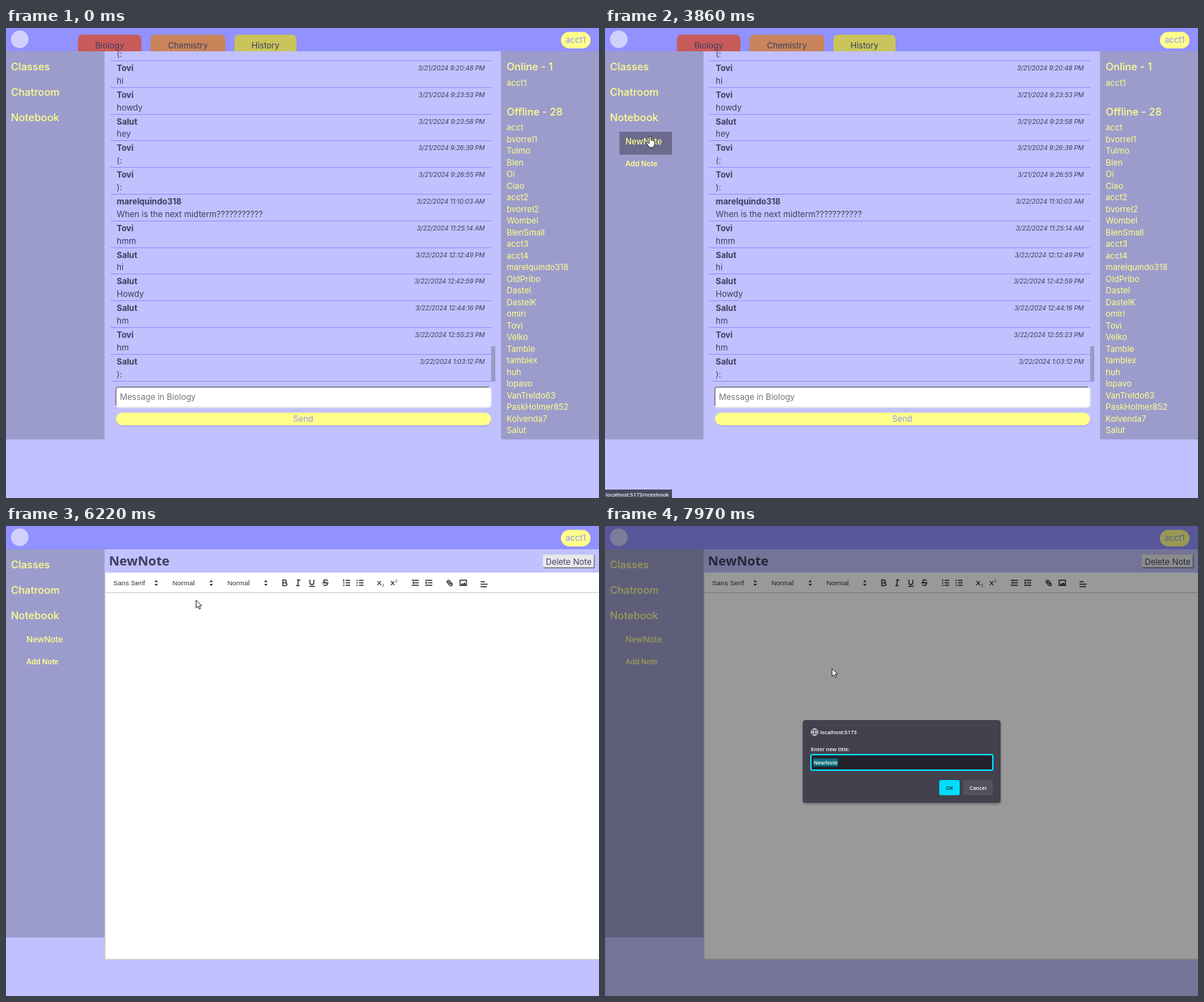
Animation of 841x666 px, one loop 8000 ms. Source, as an HTML page:

```html
<!DOCTYPE html>
<html lang="en">
<head>
<meta charset="utf-8">
<title>Class chat and notebook</title>
<style>
  html, body { margin: 0; width: 100%; height: 100%; overflow: hidden; background: #c1c1ff; }
  svg { display: block; width: 841px; height: 666px; }
  text { font: 11.7px Inter, sans-serif; fill: #3f3e5e; white-space: pre; }
  .yellow { fill: #ffff8a; }
  .head { font-size: 14.7px; font-weight: 500; }
  .item { font-weight: 500; }
  .add { font-size: 10.1px; font-weight: 600; }
  .bold { font-weight: 700; }
  .date { font-size: 9.2px; font-style: italic; letter-spacing: -.15px; text-anchor: end; }
  .mid { text-anchor: middle; }
  .lilac { fill: #9191ff; }
  .hint { fill: #75757f; }
  .title { font: 700 18.3px "Noto Sans", sans-serif; }
  .tool { font: 9.8px "Liberation Sans", sans-serif; fill: #333; }
  .tool.bold { font-weight: 700; }
  .tool.small { font-size: 6px; }
  .ui { font: 600 7.5px "Open Sans", sans-serif; fill: #fff; }
  .dark { fill: #23222b; }
  .icon { fill: none; stroke: #333; stroke-width: 1.4; }
</style>
</head>
<body>
<svg id="stage" viewBox="0 0 841 666"></svg>
<script>
const LOOP = 8000;
const YELLOW = '#ffff8a', LILAC = '#9191ff', PANEL = '#9c9ccc';

const text = (x, y, str, cls = '') => `<text x="${x}" y="${y}" class="${cls}">${str}</text>`;
const rect = (x, y, w, h, fill, extra = '') =>
  `<rect x="${x}" y="${y}" width="${w}" height="${h}" fill="${fill}" ${extra}/>`;
const path = (d, extra = 'class="icon"') => `<path d="${d}" ${extra}/>`;
const group = (id, content) => `<g id="${id}">${content}</g>`;

const messages = [
  ['Tovi', '3/21/2024 9:20:48 PM', 'hi'],
  ['Tovi', '3/21/2024 9:23:53 PM', 'howdy'],
  ['Salut', '3/21/2024 9:23:58 PM', 'hey'],
  ['Tovi', '3/21/2024 9:26:39 PM', '(:'],
  ['Tovi', '3/21/2024 9:26:55 PM', '):'],
  ['marelquindo318', '3/22/2024 11:10:03 AM', 'When is the next midterm???????????'],
  ['Tovi', '3/22/2024 11:25:14 AM', 'hmm'],
  ['Salut', '3/22/2024 12:12:49 PM', 'hi'],
  ['Salut', '3/22/2024 12:42:59 PM', 'Howdy'],
  ['Salut', '3/22/2024 12:44:16 PM', 'hm'],
  ['Tovi', '3/22/2024 12:55:23 PM', 'hm'],
  ['Salut', '3/22/2024 1:03:12 PM', '):']
];
const offline = ('acct bvorrel1 Tulmo Blen Oi Ciao acct2 bvorrel2 Wombel BlenSmall acct3 acct4 ' +
  'marelquindo318 OldPribo Dastel DastelK omiri Tovi Velko Tamble tamblex huh lopavo ' +
  'VanTreldo63 PaskHolmer852 Kolvenda7 Salut').split(' ');

function tab(x, w, color, label) {
  return path(`M${x} 33V16.5q0-7 7-7h${w - 14}q7 0 7 7V33z`, `fill="${color}"`) +
    text(x + w / 2, 29.2, label, 'mid');
}

function chatView() {
  const rows = messages.map(([name, date, body], i) => {
    const y = 46.3 + 37.8 * i;
    return rect(148, Math.round(y - .3), 540, 1, LILAC) + text(157, y + 14.6, name, 'bold') +
      text(679, y + 13.7, date, 'date') + text(157, y + 32.5, body);
  }).join('');
  const members = offline.map((name, i) => text(710, 145 + 16.5 * i, name, 'yellow')).join('');
  return text(157, 41, '(:') + rect(0, 0, 841, 33, LILAC) +
    tab(102, 90, '#c95a5a', 'Biology') + tab(205, 106, '#c9845a', 'Chemistry') +
    tab(324, 88, '#c9c45a', 'History') +
    rows + rect(151, 500, 543, 1, LILAC) + rect(688, 451, 6, 49, '#9a9ac4') +
    rect(156, 509, 532, 28.5, '#fff', 'rx="4" stroke="#e6e6ee" stroke-width="2"') +
    path('M155.8 535V513q0-4.2 4-4.2H685', 'fill="none" stroke="#7b7b86" stroke-width="1.5"') +
    text(161.5, 527, 'Message in Biology', 'hint') +
    rect(156, 547, 532, 18, '#8888c0', 'rx="9" opacity=".3"') +
    rect(156, 545, 532, 18, YELLOW, 'rx="9"') + text(421.5, 558.3, 'Send', 'mid lilac') +
    rect(702, 33, 139, 550, PANEL) +
    text(710, 60.4, 'Online - 1', 'yellow head') + text(710, 81.5, 'acct1', 'yellow') +
    text(710, 123.5, 'Offline - 28', 'yellow head') + members;
}

const picker = (x, label, arrowX) => text(x, 84, label, 'tool') +
  path(`M${arrowX - 2.5} 79.5l2.5-3 2.5 3zm0 2.5l2.5 3 2.5-3z`, 'fill="#333"');
const lines = (x, y, w) => `M${x} ${y}h${w}m${-w} 3.5h${w}m${-w} 3.5h${w}`;

function toolbar() {
  const script = (x, dy) => text(x, 84, 'X', 'tool bold') + text(x + 7, 84 + dy, '2', 'tool small');
  const indent = (x, arrow) => path(`M${x} 77h10m-6 3.5h6m-6 0h6M${x} 84h10`) +
    path(arrow, 'fill="#333"');
  return picker(152, 'Sans Serif', 213) + picker(236, 'Normal', 291) + picker(314, 'Normal', 368.5) +
    path('M392.5 76.5v8h3.5q2.5 0 2.5-2t-2.5-2h-3.5h3q2 0 2-2t-2-2z') +
    path('M412.5 76.5h5m-2.5 0l-1.5 8m-2 0h5') +
    path('M431 76v4.500q0 2.500 2.800 2.500t2.800-2.500v-4.500M430 85.500h8') +
    path('M456 78q-.5-1.700-2.800-1.700t-2.500 1.800q0 1.500 2.500 2.200t2.500 2.200-2.600 1.800-2.700-1.700M448.500 80.500h9') +
    path(lines(481.5, 77, 6.5) + 'M478.8 75.5v3M478 80.5h2M478 84h2') +
    path(lines(500.5, 77, 6.5) + 'M497 77h1.8M497 80.5h1.8M497 84h1.8') +
    script(526, 2) + script(545, -4) +
    indent(575.5, 'M579 78.5v4l-3-2z') + indent(594.5, 'M595 78.5v4l3-2z') +
    path('M628 82l-1.5-1.2a2 2 0 0 1 2.5-3.5l2 2M630 79.5l2 1.5a2 2 0 0 1-2.5 3.3l-2-2M627 78.5l4.5 4.5') +
    path('M644 76.7h9v7.6h-9z') + path('M645 83.5l2-2.5 1.5 1 2-2.2 1.8 3.7z', 'fill="#333"') +
    path('M673 79h6M673 82.5h10M673 86h9');
}

function noteView() {
  return text(146, 56, 'NewNote', 'title') +
    rect(761, 40, 74, 20, '#e9e9ed') +
    path('M761.5 59.5V40.5H834', 'fill="none" stroke="#d4d4dc"') +
    path('M762 59.3H834.3V41', 'fill="none" stroke="#777783" stroke-width="1.4"') +
    text(798, 54.5, 'Delete Note', 'mid') +
    rect(140, 66, 701, 549, '#ccc') + rect(141, 66, 700, 547.5, '#fff') +
    rect(140, 94, 701, 1, '#ccc') + toolbar();
}

function dialogView() {
  return rect(0, 0, 841, 666, '#000', 'opacity=".4"') +
    rect(279, 276, 284, 120, '#000', 'rx="6" opacity=".12"') +
    rect(280.5, 275, 280.5, 117.5, '#42414d', 'rx="4"') +
    path('M292.5 292a4.8 4.8 0 1 0 9.6 0a4.8 4.8 0 1 0-9.6 0h9.6M297.3 287.2q-4.5 4.8 0 9.6q4.5-4.8 0-9.6',
      'fill="none" stroke="#fff" stroke-width=".9"') +
    text(305, 294.8, 'localhost:5173', 'ui') + text(292, 318.7, 'Enter new title:', 'ui') +
    rect(292, 324, 258, 22, '#23222b', 'rx="2" stroke="#00ddff" stroke-width="2"') +
    rect(295.5, 329.5, 35, 11, '#10717f') + text(296, 338, 'NewNote', 'ui') +
    rect(474, 360, 29, 21.5, '#00ddff', 'rx="2"') + text(488.5, 373.7, 'OK', 'ui dark mid') +
    rect(508, 360, 42, 21.5, '#52515d', 'rx="2"') + text(529, 373.7, 'Cancel', 'ui mid');
}

document.getElementById('stage').innerHTML =
  rect(0, 0, 841, 666, '#c1c1ff') + rect(0, 0, 841, 33, LILAC) +
  group('chat', chatView()) + group('note', noteView()) +
  '<circle cx="19.5" cy="16" r="12.5" fill="#d0d0ff"/>' +
  rect(787, 5.5, 42, 23.5, YELLOW, 'rx="11.75"') + text(808, 21.3, 'acct1', 'mid lilac') +
  rect(0, 33, 139.7, 550, PANEL) + rect(0, 0, 0, 0, '#6c6b8e', 'id="highlight"') +
  text(7, 60.4, 'Classes', 'yellow head') + text(7, 96, 'Chatroom', 'yellow head') +
  text(7, 131.8, 'Notebook', 'yellow head') +
  group('newItem', text(29, 164.8, 'NewNote', 'yellow item')) +
  group('addItem', text(29, 163.2, 'Add Note', 'yellow add')) +
  group('status', rect(0, 654, 95, 12, '#2b2a33') + text(1, 664.3, 'localhost:5173/notebook', 'ui')) +
  group('dialog', dialogView()) +
  '<circle id="click" r="8.5" fill="#ff0" opacity=".5"/>' +
  group('hand', path('M-1.3 1q1.3-1.7 2.5 0v5l4.3 1q1.5.5 1.3 2l-.8 4.5-1 2.7h-6l-4-5.5q-.8-1.7 1-1.7l2.7 1.5z',
    'fill="#fff" stroke="#111" stroke-width=".9"')) +
  group('arrow', path('M0 0v11l2.6-2.3 1.8 4 1.8-.8-1.8-3.9h3.6z', 'fill="#fff" stroke="#111" stroke-width=".9"'));

const el = Object.fromEntries([...document.querySelectorAll('[id]')].map(e => [e.id, e]));
const show = (e, on) => e.setAttribute('display', on ? 'inline' : 'none');

// Cursor stops: time, x, y
const route = [
  [530, 757, 650], [860, 265, 541], [1000, 98, 420], [1080, 75, 277], [1170, 66, 62], [1300, 62, 135],
  [2700, 62, 135], [2840, 60, 159], [3510, 60, 159], [3720, 64, 153], [3930, 64, 153],
  [4080, 66, 128], [4300, 130, 140], [4640, 80, 161], [5440, 80, 161], [5700, 300, 240],
  [6000, 110, 100], [6080, 110, 100], [6360, 427, 110], [6770, 427, 110], [7290, 260, 54],
  [7630, 260, 54], [7720, 212, 110], [7940, 322, 202], [LOOP, 322, 202]
];
const clicks = [[2100, 2170], [2980, 3040], [5230, 5300], [7430, 7560]];
const OPEN_MENU = 2100, CREATE = 3040, OPEN_NOTE = 5370, PROMPT = 7560;

function cursorAt(t) {
  const i = Math.max(1, route.findIndex(stop => stop[0] > t));
  const [t0, x0, y0] = route[i - 1], [t1, x1, y1] = route[i];
  const k = Math.max(0, (t - t0) / (t1 - t0));
  return [x0 + (x1 - x0) * k, y0 + (y1 - y0) * k];
}

function hoveredBox(t, x, y) {
  const boxes = [[0, 40, 139.7, 36], [0, 76, 139.7, 35], [0, 111, 139.7, 36]];
  if (t >= CREATE) boxes.push([20.5, 147, 74.5, 32.5], [20.5, 179.5, 68, 32]);
  else if (t >= OPEN_MENU) boxes.push([20.5, 147, 68, 32]);
  return boxes.find(([bx, by, w, h]) => x >= bx && x < bx + w && y >= by && y < by + h);
}

function statusOpacity(t) {
  if (t >= 3110 && t < 3930) return .8;
  if (t >= 4570 && t < OPEN_NOTE) return 1;
  if (t >= OPEN_NOTE && t < 5440) return .6;
  return 0;
}

function draw(t) {
  const [x, y] = cursorAt(t);
  const visible = t >= 530, noteOpen = t >= OPEN_NOTE, prompt = t >= PROMPT;
  const box = visible && !prompt && hoveredBox(t, x, y);
  const overSend = !noteOpen && x > 156 && x < 688 && y > 545 && y < 563;

  show(el.chat, !noteOpen);
  show(el.note, noteOpen);
  show(el.dialog, prompt);
  show(el.newItem, t >= CREATE);
  show(el.addItem, t >= OPEN_MENU);
  el.addItem.setAttribute('transform', `translate(0 ${t >= CREATE ? 32.7 : 0})`);
  el.status.setAttribute('opacity', statusOpacity(t));

  show(el.highlight, box);
  if (box) ['x', 'y', 'width', 'height'].forEach((name, i) => el.highlight.setAttribute(name, box[i]));
  show(el.hand, visible && (box || overSend));
  show(el.arrow, visible && !box && !overSend);
  show(el.click, clicks.some(([from, to]) => t >= from && t < to));
  for (const e of [el.hand, el.arrow, el.click]) e.setAttribute('transform', `translate(${x} ${y})`);
}

const start = performance.now();
function tick() {
  draw((performance.now() - start) % LOOP);
  requestAnimationFrame(tick);
}
tick();
</script>
</body>
</html>
```
